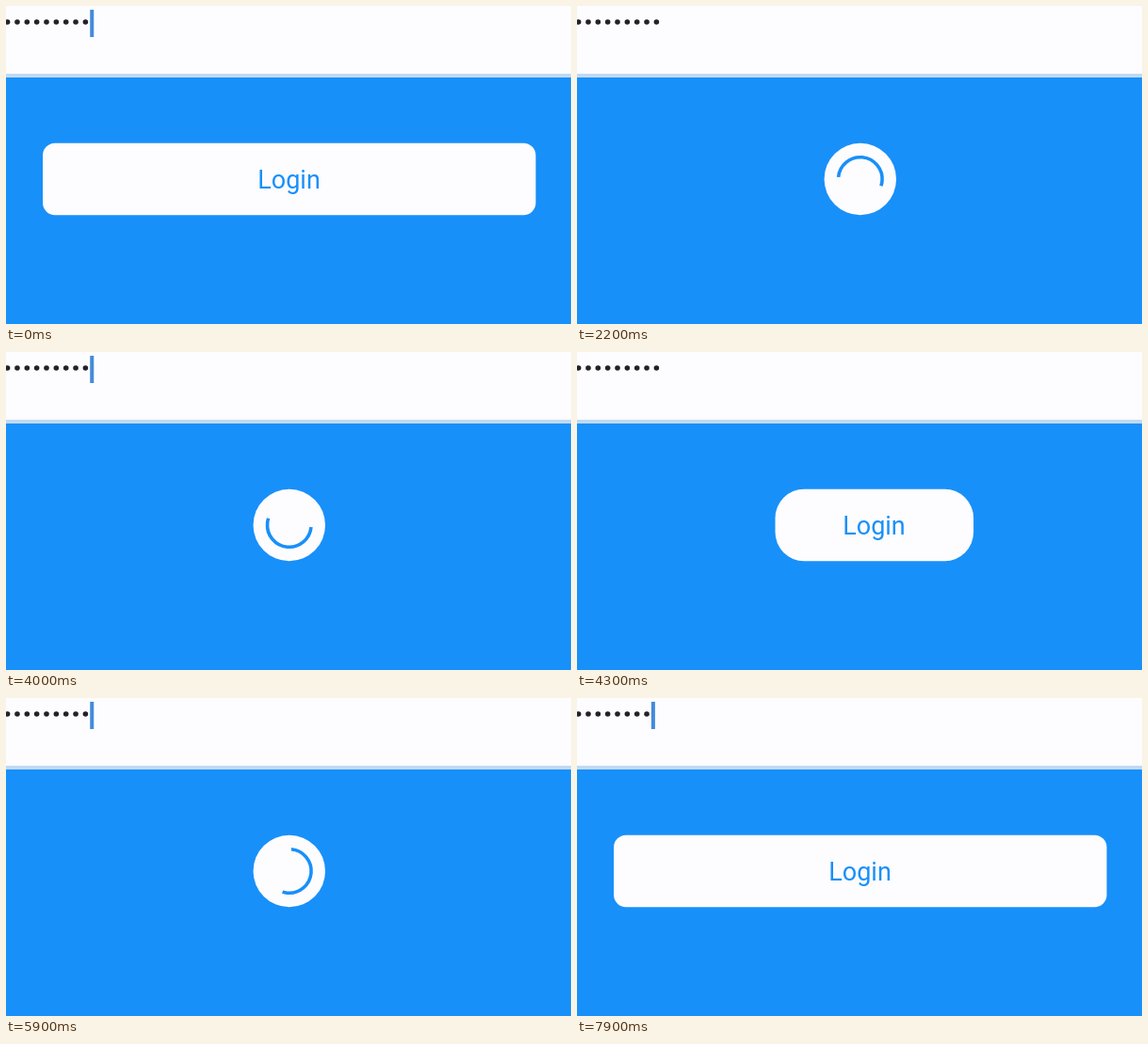
Animation of 600x338 px, one loop 8 s. Source, as an HTML page with a canvas:

```html
<!DOCTYPE html>
<html lang="en">
<head>
<meta charset="utf-8">
<title>Login button</title>
<style>
  html, body { margin: 0; width: 100%; height: 100%; overflow: hidden; background: #1890f9; }
  canvas { display: block; }
</style>
</head>
<body>
<canvas id="stage" width="600" height="338"></canvas>
<script>
const ctx = document.getElementById('stage').getContext('2d');

const LOOP = 8000, STEP = 100;
const BLUE = '#1890f9', WHITE = '#fdfcff', PRESSED = '#f9f8fb';
const BUTTON = { x: 300.8, y: 184, width: 523.5, height: 76.5, radius: 13 };
const SHAKE = { duration: 700, offsets: [0, -15, 15, -15, 15, -15, 15, 0] };
const EXPAND_DELAY = 217, MORPH = 100;

// Each attempt: touch down, touch up, and the moment the failure shake begins.
const attempts = [
  { down: 1800, up: 1970, fail: 2666 },
  { down: 3400, up: 3570, fail: 4053 },
  { down: 5400, up: 5570, fail: 6020 },
];

const clamp = v => Math.min(1, Math.max(0, v));
const progress = (t, start, duration) => clamp((t - start) / duration);
const mix = (a, b, p) => a + (b - a) * p;
const smooth = p => p * p * (3 - 2 * p);

function shakeOffset(time) {
  const { duration, offsets } = SHAKE;
  const position = smooth(clamp(time / duration)) * (offsets.length - 1);
  const i = Math.min(Math.floor(position), offsets.length - 2);
  return mix(offsets[i], offsets[i + 1], position - i);
}

function buttonState(t) {
  const attempt = attempts.find(a => t >= a.down && t < a.fail + SHAKE.duration);
  if (!attempt) return { wide: 1, square: 1, shift: 0, title: true };
  const { down, up, fail } = attempt;
  const expand = progress(t, fail + EXPAND_DELAY, MORPH);
  return {
    touched: t >= down && t < up,
    square: t < fail ? 1 - progress(t, up, MORPH) : expand,
    wide: t < fail ? 1 - progress(t, up + MORPH, MORPH) : expand,
    shift: shakeOffset(t - fail),
    title: t < up || expand > 0,
    spinning: t >= up + 2 * MORPH && expand === 0,
  };
}

function disc(x, y, r, color) {
  ctx.fillStyle = color;
  ctx.beginPath();
  ctx.arc(x, y, r, 0, Math.PI * 2);
  ctx.fill();
}

function drawPassword(t) {
  const count = t < 7900 ? 9 : 8;
  const spacing = 10.35;
  for (let i = 0; i < count; i++) disc(1.6 + i * spacing, 17, 2.8, '#242226');

  // The caret fades out and back in once per second.
  const phase = t % 1000;
  ctx.globalAlpha = phase < 500 ? 1 - progress(phase, 50, 150) : progress(phase, 550, 100);
  ctx.fillStyle = '#438bdb';
  ctx.fillRect(count * spacing - 3.9, 4, 4, 29);
  ctx.globalAlpha = 1;
}

function drawSpinner(t) {
  const start = Math.PI * (1.03 + (t - 2200) / 200);
  ctx.strokeStyle = BLUE;
  ctx.lineWidth = 3.6;
  ctx.beginPath();
  ctx.arc(0, 0, 23.3, start, start + Math.PI * 1.07);
  ctx.stroke();
}

function drawButton(t) {
  const state = buttonState(t);
  const { x, y, width, height, radius } = BUTTON;
  const w = mix(height, width, state.wide);

  ctx.save();
  ctx.translate(x + state.shift, y);
  ctx.fillStyle = state.touched ? PRESSED : WHITE;
  ctx.beginPath();
  ctx.roundRect(-w / 2, -height / 2, w, height, mix(height / 2, radius, state.square));
  ctx.fill();
  if (state.touched) disc(-21.5, 17.5, 10.5, '#e2e1e4');
  if (state.title) {
    ctx.fillStyle = BLUE;
    ctx.font = '27px Roboto, sans-serif';
    ctx.textAlign = 'center';
    ctx.fillText('Login', -0.3, 10);
  }
  if (state.spinning) drawSpinner(t);
  ctx.restore();
}

function draw() {
  const t = Math.floor(performance.now() % LOOP / STEP) * STEP;
  ctx.fillStyle = BLUE;
  ctx.fillRect(0, 0, 600, 338);
  ctx.fillStyle = WHITE;
  ctx.fillRect(0, 0, 600, 72);
  ctx.fillStyle = '#c0d9f1';
  ctx.fillRect(0, 72, 600, 4);
  drawPassword(t);
  drawButton(t);
  requestAnimationFrame(draw);
}
draw();
</script>
</body>
</html>
```
